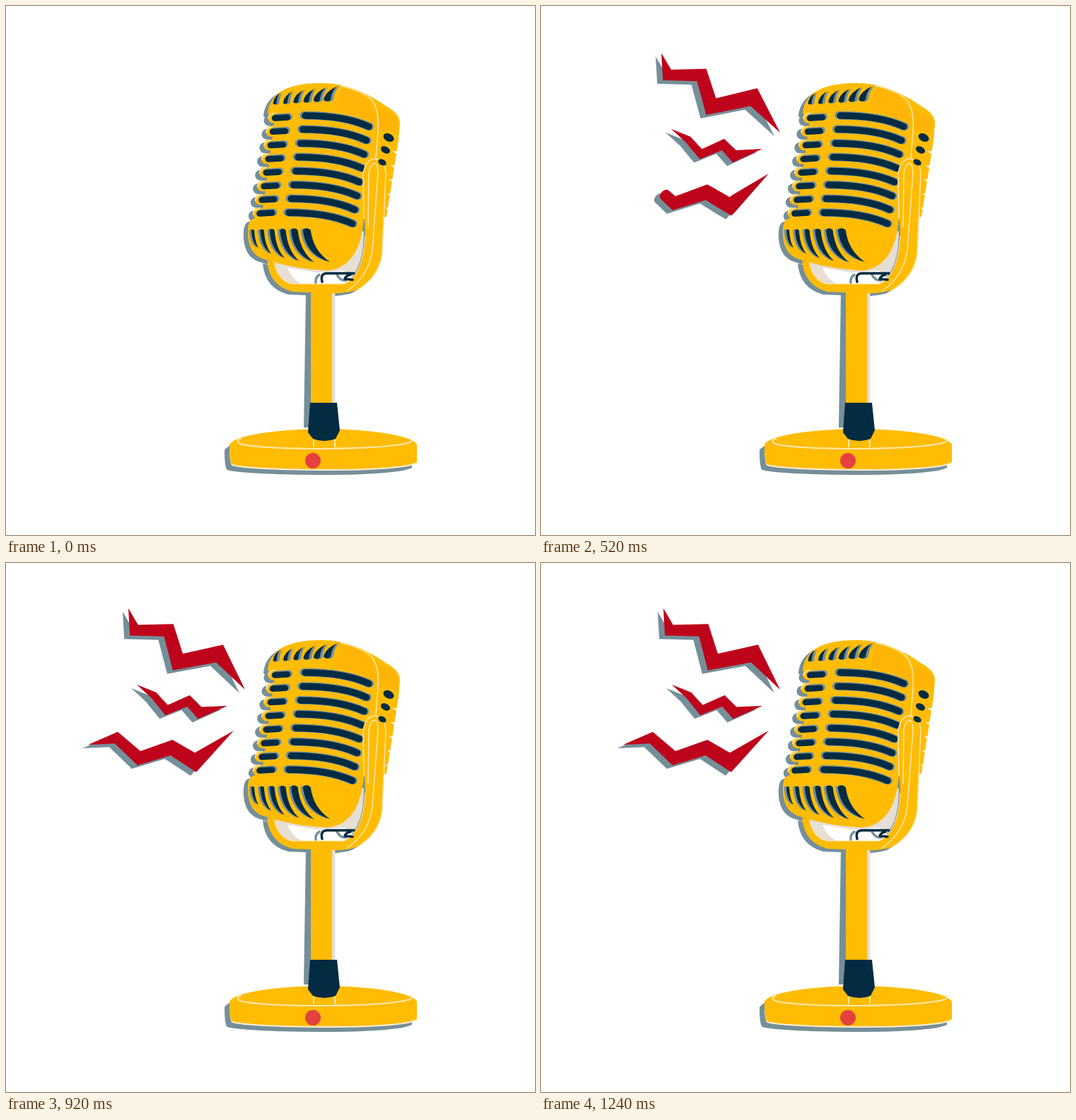
Animation of 748 by 748 pixels, one loop 1280 ms. Source, as an HTML page with a canvas:

```html
<!DOCTYPE html>
<html lang="en">
<head>
<meta charset="utf-8">
<title>Microphone</title>
<style>
  html, body { margin: 0; width: 100%; height: 100%; overflow: hidden; background: #fff; }
  canvas { display: block; width: 748px; height: 748px; }
</style>
</head>
<body>
<canvas id="stage" width="748" height="748"></canvas>
<script>
const SIZE = 748, LOOP = 1280, STEP = 40, RINGS = 8, TEETH = 6;
const YELLOW = '#ffbc03', AMBER = '#ffb508', NAVY = '#032b42', SLATE = '#758f99';
const BEIGE = '#e7ded4', CREAM = '#ffe7ae', RED = '#be041b';

const makeLayer = () => {
  const layer = document.createElement('canvas');
  layer.width = layer.height = SIZE;
  return layer.getContext('2d');
};
const stage = document.getElementById('stage').getContext('2d');
const mic = makeLayer(), scratch = makeLayer();

function fill(d, color) {
  mic.fillStyle = color;
  mic.fill(new Path2D(d));
}
function line(d, color, width = 1.5) {
  mic.strokeStyle = color;
  mic.lineWidth = width;
  mic.lineCap = mic.lineJoin = 'round';
  mic.stroke(new Path2D(d));
}
function oval(x, y, rx, ry, turn, color) {
  mic.fillStyle = color;
  mic.beginPath();
  mic.ellipse(x, y, rx, ry, turn, 0, 2 * Math.PI);
  mic.fill();
}
function shifted(dx, dy, draw) {
  mic.save();
  mic.translate(dx, dy);
  draw();
  mic.restore();
}
function repeat(count, draw) {
  for (let i = 0; i < count; i++) draw(i);
}

const HEAD = `M370 152C372 128 390 109 446 109C480 109 510 122 538 142Q557 152 557 166
  L555 190L538 298L506 302Q500 368 456 374Q405 372 362 357Q344 350 342 325
  Q341 306 347 302L362 296L380 160Z`;
const YOKE = `M505 240Q506 217 521 216Q537 218 537 238L532 350Q528 385 495 402Q480 407 455 406
  L405 404Q372 395 369 360L380 363Q385 390 405 393L478 393Q506 382 508 325Z`;
const BASE = 'M316 620A133 24 0 0 1 581 620V645Q560 655 450 655Q340 654 320 648Q316 646 316 620Z';

const ringX = k => 376 - 3.1 * k, ringY = k => 158 + 19.3 * k;

function headShape(color) {
  fill(HEAD, color);
  repeat(RINGS, k => line(`M${ringX(k) + 2} ${ringY(k)}h30`, color, 15));
}

function drawShadows() {
  shifted(-6, 4, () => {
    headShape(SLATE);
    fill(YOKE, SLATE);
  });
  shifted(-7, 8, () => fill(BASE, SLATE));
  fill('M424 405H432V596H421Z', SLATE);
}

function drawStand() {
  shifted(0, 2, () => fill(BASE, '#fff0d8'));
  fill(BASE, YELLOW);
  line('M332 612Q322 616 334 620Q365 626 450 626Q545 625 571 617Q577 614 572 611', CREAM, 2);
  fill('M460 405H465.5V562H460Z', BEIGE);
  fill('M431 405H461V562H431ZM435 610H466V624H435Z', YELLOW);
  line('M435 614V623M465 614V623', CREAM, 2);
  fill('M430 561H468L472 600L466 612Q450 618 434 612L427 603Z', NAVY);
  oval(434, 643, 11, 11, 0, '#e5413f');
}

function drawYokeInside() {
  fill('M372 355L506 318Q506 385 470 393H405Q380 388 376 360Z', BEIGE);
  fill('M398 370L440 377L478 374L492 386L478 393H418Q404 386 398 370Z', '#fff');
}

// Tapered tooth that leaves its head upright and then bends right to a point.
function tooth(x, y, dx, dy, width) {
  const blade = (shift, extra, color) => {
    const h = (width + extra) / 2, round = -Math.sign(dy) * h;
    const cx = x + shift + dx * 0.12, cy = y + dy * 0.72;
    fill(`M${x + shift - h} ${y}Q${x + shift} ${y + round} ${x + shift + h} ${y}
      Q${cx + h} ${cy - h / 2} ${x + shift + dx} ${y + dy}
      Q${cx - h} ${cy + h / 2} ${x + shift - h} ${y}Z`, color);
  };
  blade(dy < 0 ? 3 : -2.5, 1.5, SLATE);
  blade(0, 0, NAVY);
}

function drawGrille() {
  repeat(RINGS, k => {
    const x = ringX(k), y = ringY(k), sx = 423 - 3.3 * k, sy = 155 + 19.6 * k;
    const slot = `M${sx} ${sy}Q${sx + 56} ${sy} ${sx + 90} ${sy + 15.5}`;
    line(`M${x - 5} ${y + 1}Q${x - 4} ${y - 6} ${x + 5} ${y - 7}`, CREAM);
    line(`M${x + 6} ${y - 0.5}L${x + 24} ${y - 1.5}`, SLATE, 10);
    line(`M${x + 4} ${y + 0.5}L${x + 22} ${y - 0.5}`, NAVY, 8.5);
    shifted(-2, -0.5, () => line(slot, SLATE, 11.5));
    shifted(1.5, 0, () => line(slot, SLATE, 11));
    line(slot, NAVY, 9.5);
  });
  repeat(TEETH, i => {
    tooth(380 + 14.8 * i, 138 - 1.1 * i, 9 + 2 * i, -16 - i, 5 + i);
    tooth(349 + 12.5 * i + 0.55 * i * i, 317, 8 + 5 * i, 25 + 9.5 * i - 1.1 * i * i, 4 + 1.4 * i);
  });
}

function drawSide() {
  fill('M474 115Q517 125 524 160L522 172Q500 152 466 148Z', AMBER);
  fill('M526 145Q550 150 555 168L553 182Q538 174 526 176Z', AMBER);
  line('M473 113Q513 121 521 139Q528 152 526 176L523 216', CREAM);
  repeat(5, k => {
    const x = 546 - 2.5 * k, y = 205 + 20 * k;
    fill(`M${x} ${y}L${x + 11} ${y + 1}L${x + 9} ${y + 6}Z`, '#fff');
  });
}

function drawYoke() {
  fill(YOKE, YELLOW);
  line('M506 300L505 238Q508 217 521 216Q536 218 537 237L532 350Q528 382 498 401', CREAM);
  line('M512 312L513 236Q515 224 521 222Q526 224 526 236L518 345Q513 382 482 403', CREAM);
  line('M380 365Q385 389 405 393H478Q505 381 508 325', CREAM, 1.2);
}

function drawDetails() {
  repeat(3, k => oval(541 - 4.5 * k, 186 + 17.5 * k, 8 - k, 5.4 - 0.7 * k, 0.5, NAVY));
  line('M438 391Q437 384 443 380M468 380Q473 389 481 388', SLATE, 3.5);
  line('M447 390Q444 378 454 378H492M487 380Q481 381 479 386L490 387', NAVY, 3.5);
}

// spine: centre line from the microphone outwards; sway: shift of the far end.
const bolts = [
  { start: 38, girth: 12.5, sway: [-5, 4.5],
    spine: [[338, 179], [302, 128], [243, 140], [230, 95], [181, 95], [173, 64]] },
  { start: 240, girth: 8.5, sway: [-2, 3],
    spine: [[313, 202], [274, 212], [258, 195], [227, 208], [209, 187], [185, 172]] },
  { start: 305, girth: 12.5, sway: [0, 5],
    spine: [[322, 237], [268, 282], [234, 261], [188, 276], [156, 247], [116, 257]] }
];
const SPEED = 0.8;

function trace(points) {
  const path = new Path2D();
  points.forEach(([x, y]) => path.lineTo(x, y));
  return path;
}
const lengthOf = points => points.slice(1).reduce(
  (sum, [x, y], i) => sum + Math.hypot(x - points[i][0], y - points[i][1]), 0);

function normal([ax, ay], [bx, by]) {
  const d = Math.hypot(bx - ax, by - ay);
  return [(ay - by) / d, (bx - ax) / d];
}

// Outline with sharp mitred corners, pointed at both ends and thinner outwards.
function outline(spine, girth) {
  const last = spine.length - 1, side = sign => spine.map((p, i) => {
    if (i === 0 || i === last) return p;
    const [ax, ay] = normal(spine[i - 1], p), [bx, by] = normal(p, spine[i + 1]);
    const reach = sign * girth * (1 - 0.5 * i / last) / (1 + ax * bx + ay * by);
    return [p[0] + (ax + bx) * reach, p[1] + (ay + by) * reach];
  });
  return trace([...side(1), ...side(-1).reverse()]);
}

function swayAt(t) {
  const phase = (t - 400) / 520;
  return phase > 0 && phase < 1 ? Math.min(1, 1.3 * Math.sin(Math.PI * phase) ** 2) : 0;
}

function drawBolt({ start, girth, sway, spine }, t) {
  const grown = (t - start) * SPEED;
  if (grown <= 0) return;
  const bent = spine.map(([x, y]) => {
    const w = swayAt(t) * Math.min(1, (spine[0][0] - x) / 110);
    return [x + sway[0] * w, y + sway[1] * w];
  });
  const shape = outline(bent, girth);
  const paint = (color, dx, dy) => {
    scratch.globalCompositeOperation = 'source-over';
    scratch.clearRect(0, 0, SIZE, SIZE);
    scratch.fillStyle = color;
    scratch.fill(shape);
    if (grown < lengthOf(bent)) {
      scratch.globalCompositeOperation = 'destination-in';
      scratch.lineWidth = girth * 1.7;
      scratch.lineCap = 'round';
      scratch.setLineDash([grown, SIZE * 2]);
      scratch.stroke(trace(bent));
    }
    stage.drawImage(scratch.canvas, dx, dy);
  };
  paint(SLATE, -8, 5);
  paint(RED, 0, 0);
}

function render(now) {
  const t = Math.floor((now % LOOP) / STEP) * STEP;
  stage.fillStyle = '#fff';
  stage.fillRect(0, 0, SIZE, SIZE);
  stage.drawImage(mic.canvas, 0, 0);
  bolts.forEach(bolt => drawBolt(bolt, t));
}

let begin;
function tick(now) {
  begin ??= now;
  render(now - begin);
  requestAnimationFrame(tick);
}

drawShadows();
drawStand();
drawYokeInside();
headShape(YELLOW);
drawSide();
drawGrille();
drawYoke();
drawDetails();
render(0);
requestAnimationFrame(tick);
</script>
</body>
</html>
```
